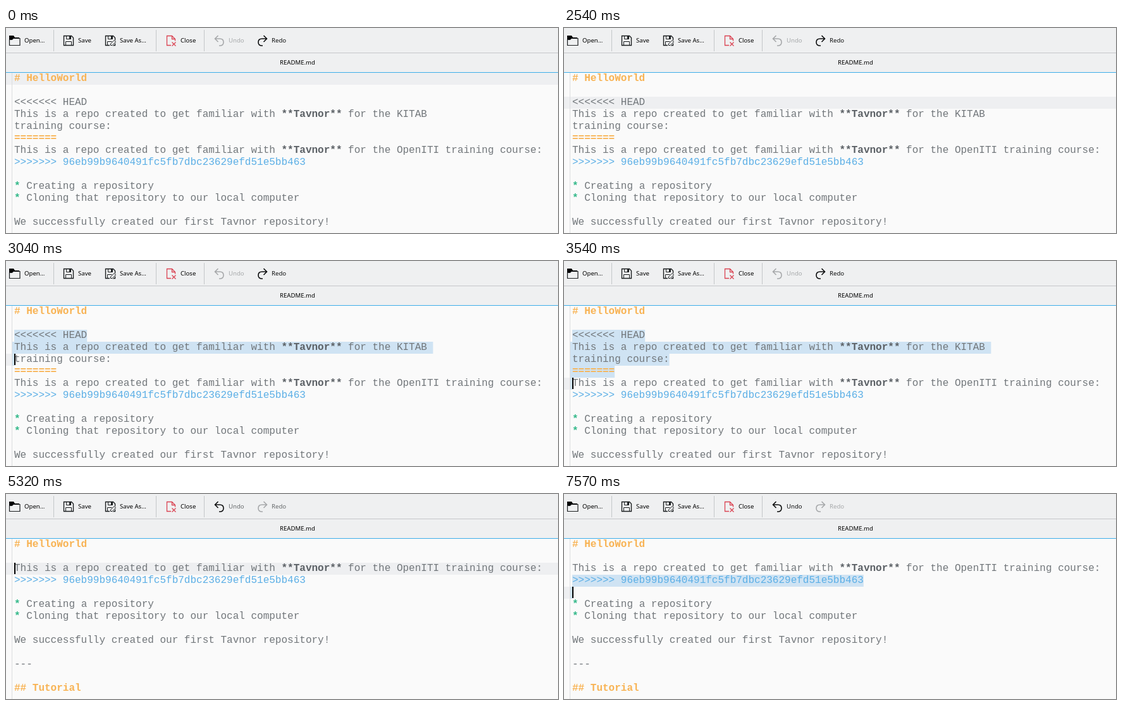
Write an HTML page that moves like this. It is 873x325 px and loops after 8000 ms.

```html
<!DOCTYPE html>
<html lang="en">
<head>
<meta charset="utf-8">
<title>Editor</title>
<style>
  html, body { margin: 0; height: 100%; overflow: hidden; background: #fafafa; }
  svg { display: block; }
  text { white-space: pre; }
  #toolbar text { font: 9.6px "Noto Sans", sans-serif; }
  .code text { font: 16px "Liberation Mono", monospace; fill: #72777b; }
  .code .head { font-weight: bold; fill: #f8b354; }
  .code .link { fill: #5cafe6; }
  .code .strong { font-weight: bold; fill: #5c6166; }
  .code .bullet { font-weight: bold; fill: #35b98a; }
</style>
</head>
<body>
<svg width="873" height="325" viewBox="0 0 873 325">
  <rect id="current" height="19" fill="#eeeff1"/>
  <path d="M9.5 71V325" stroke="#dcdddf"/>
  <g id="selection" fill="#cfe3f3"></g>
  <g id="top" class="code"></g>
  <g id="conflict" class="code"></g>
  <g id="rest" class="code"></g>
  <rect id="caret" x="13" width="2" height="18" fill="#000"/>

  <g id="toolbar" fill="#000">
    <rect width="873" height="70" fill="#eff0f1"/>
    <path d="M0 39.5H873M75.5 3V37M237.5 3V37M313.5 3V37" stroke="#c4c7c9"/>
    <rect y="70" width="873" height="1" fill="#3daee9"/>
    <path d="M5 12h7l2 3h7v2H11l-2 2H5z"/>
    <path d="M5.5 18.5h4l2-2h10.5v11H5.5z" fill="#eff0f1" stroke="#1b1e20" stroke-width="1.2"/>
    <g id="floppy" fill="none" stroke="#1b1e20">
      <path d="M91.5 12.5h12l3 3v12h-15z" stroke-width="1.4"/>
      <path d="M95.5 12.5v5h7v-5M94.5 27.5v-6h9v6"/>
      <path d="M100 13h2v4h-2z" fill="#1b1e20" stroke="none"/>
    </g>
    <use href="#floppy" x="66"/>
    <path d="M164 29v-4l7-7 4 4-7 7z" fill="#eff0f1"/>
    <path d="M165.5 27.5v-2.5l5.5-5.5 2.5 2.5-5.5 5.5z" fill="none" stroke="#1b1e20"/>
    <g fill="none" stroke="#da4453" stroke-width="1.3">
      <path d="M261 27.5h-6.5v-15h8l5 5v3M262.5 12.5v5h5"/>
      <path d="M262.5 22.5l6 6m0-6l-6 6"/>
    </g>
    <g fill="none" stroke-width="1.6">
      <path id="undoIcon" d="M335.5 12l-5 5 5 5M331 17h7q6 0 6 5.5t-6 5.5h-1"/>
      <path id="redoIcon" d="M407.5 12l5 5-5 5M412 17h-7q-6 0-6 5.5t6 5.5h1"/>
    </g>
    <text x="29" y="23">Open...</text>
    <text x="114" y="23">Save</text>
    <text x="180" y="23">Save As...</text>
    <text x="276" y="23">Close</text>
    <text x="352" y="23" id="undoLabel">Undo</text>
    <text x="420" y="23" id="redoLabel">Redo</text>
    <text x="433" y="58">README.md</text>
  </g>
</svg>
<script>
const LEFT = 13, TOP = 71, ROW = 19, CHAR = 9.6, LOOP = 8000;
const DELETED_AT = 5320, LABELS_AT = 5570;
const DARK = '#0c0d0e', PALE = '#a6a8aa', MIDDLE = '#65686a';
const $ = id => document.getElementById(id);
const rowY = row => TOP + row * ROW;

const intro = 'This is a repo created to get familiar with **Tavnor** for the ';
const lines = [
  '# HelloWorld',
  '',
  '<<<<<<< HEAD',
  intro + 'KITAB ',
  'training course:',
  '=======',
  intro + 'OpenITI training course:',
  '>>>>>>> 96eb99b9640491fc5fb7dbc23629efd51e5bb463',
  '',
  '* Creating a repository',
  '* Cloning that repository to our local computer',
  '',
  'We successfully created our first Tavnor repository!',
  '',
  '---',
  '',
  '## Tutorial'
];
const conflictStart = 2, conflictEnd = 6, conflictSize = conflictEnd - conflictStart;

// time, caret row, caret visible, first selected row (optional)
const steps = [
  [0, 0, 0], [250, 0, 1], [770, 0, 0], [1270, 0, 1], [1520, 1, 1],
  [2020, 2, 1], [2540, 2, 0],
  [2790, 3, 1, 2], [3040, 4, 1, 2], [3290, 5, 1, 2], [3540, 6, 1, 2],
  [4040, 6, 0, 2], [4540, 6, 1, 2], [5040, 6, 0, 2],
  [5320, 2, 1], [5820, 2, 0], [6070, 3, 1],
  [6570, 4, 1, 3], [7070, 4, 0, 3], [7570, 4, 1, 3]
];

function styleOf(line) {
  if (/^[#=]/.test(line)) return 'head';
  return line[0] === '>' ? 'link' : '';
}

function markup(line, row) {
  const body = line.replace(/</g, '&lt;')
    .replace(/\*\*\w+\*\*/, '<tspan class="strong">$&</tspan>')
    .replace(/^\*(?= )/, '<tspan class="bullet">*</tspan>');
  return `<text x="${LEFT}" y="${rowY(row) + 13}" class="${styleOf(line)}">${body}</text>`;
}

const texts = lines.map(markup);
$('top').innerHTML = texts.slice(0, conflictStart).join('');
$('conflict').innerHTML = texts.slice(conflictStart, conflictEnd).join('');
$('rest').innerHTML = texts.slice(conflictEnd).join('');

function selectionRects(first, caretRow, deleted) {
  let rects = '';
  for (let row = first; row <= caretRow; row++) {
    const x = row === first ? LEFT : 10;
    const line = lines[deleted ? row + conflictSize : row];
    const end = row === caretRow ? LEFT : LEFT + line.length * CHAR;
    rects += `<rect x="${x}" y="${rowY(row)}" width="${end - x}" height="${ROW}"/>`;
  }
  return rects;
}

function draw(time) {
  const [, row, caretOn, first] = steps.findLast(step => step[0] <= time);
  const deleted = time >= DELETED_AT, settled = time >= LABELS_AT;
  const selecting = first !== undefined;

  $('current').setAttribute('y', rowY(row));
  $('current').setAttribute('width', selecting ? 9 : 873);
  $('selection').innerHTML = selecting ? selectionRects(first, row, deleted) : '';
  $('caret').setAttribute('y', rowY(row));
  $('caret').setAttribute('visibility', caretOn ? 'visible' : 'hidden');
  $('conflict').setAttribute('visibility', deleted ? 'hidden' : 'visible');
  $('rest').setAttribute('transform', `translate(0 ${deleted ? -conflictSize * ROW : 0})`);

  $('undoIcon').setAttribute('stroke', deleted ? DARK : PALE);
  $('redoIcon').setAttribute('stroke', deleted ? PALE : DARK);
  $('undoLabel').setAttribute('fill', settled ? DARK : deleted ? MIDDLE : PALE);
  $('redoLabel').setAttribute('fill', settled ? PALE : deleted ? MIDDLE : DARK);
}

const start = performance.now();
function tick() {
  draw((performance.now() - start) % LOOP);
  requestAnimationFrame(tick);
}
tick();
</script>
</body>
</html>
```
